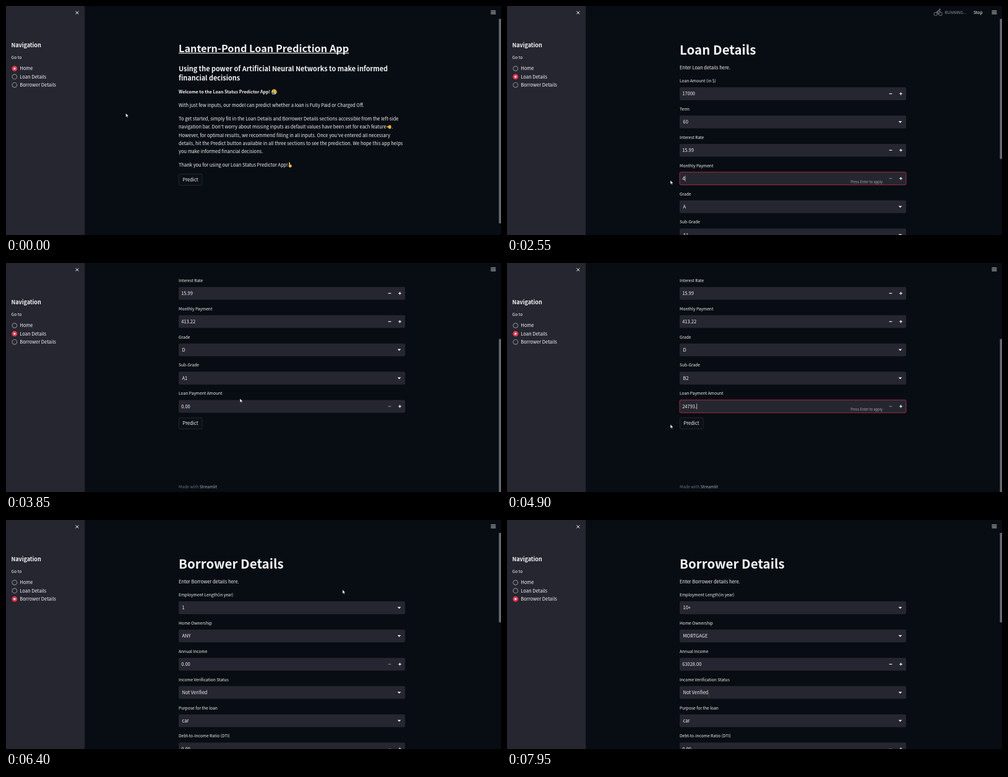
An HTML page with a canvas for the animation above (8 s loop, 800 by 372 pixels).

```html
<!DOCTYPE html>
<html lang="en">
<head>
<meta charset="utf-8">
<title>Loan Prediction App</title>
<style>
html, body { margin: 0; width: 100%; height: 100%; overflow: hidden; background: #070d12; }
canvas { display: block; width: 800px; height: 372px; }
</style>
</head>
<body>
<canvas id="stage"></canvas>
<script>
const W = 800, H = 372, LOOP = 8000;
const LEFT = 279, RIGHT = 645, ROW = 45.9, ITEM = 20.85;
const BG = '#070d12', PANEL = '#25262f', INK = '#f4f5f7', RED = '#c22f4a';
const FAMILY = '"Noto Sans CJK SC", "Noto Sans CJK JP", "Noto Sans", sans-serif';

const canvas = document.getElementById('stage');
const ctx = canvas.getContext('2d');
const dpr = window.devicePixelRatio || 1;
canvas.width = W * dpr;
canvas.height = H * dpr;

// Rows: label, kind, starting value
const num = (label, value = '0.00') => ({ label, kind: 'num', value });
const pick = (label, value) => ({ label, kind: 'pick', value });
const pages = {
  loan: {
    title: 'Loan Details', intro: 'Enter Loan details here.',
    rows: [
      num('Loan Amount (in $)', '0'), pick('Term', '36'), num('Interest Rate'),
      num('Monthly Payment'), pick('Grade', 'A'), pick('Sub-Grade', 'A1'),
      num('Loan Payment Amount')
    ]
  },
  borrower: {
    title: 'Borrower Details', intro: 'Enter Borrower details here.',
    rows: [
      pick('Employment Length(in year)', '1'), pick('Home Ownership', 'ANY'),
      num('Annual Income'), pick('Income Verification Status', 'Not Verified'),
      pick('Purpose for the loan', 'car'), num('Debt-to-Income Ratio (DTI)'),
      num('Delinquency count in the past 2 years'),
      num('Credit inquiry count in the last 6 months:'),
      num('Open credit account count'), num('Derogatory public record count'),
      num('Revolving balance'), num('Revolving line utilization rate'),
      num('Total credit account count')
    ]
  }
};

// Typed fields: focus, first key, last key, commit
const typed = [
  { page: 'loan', row: 0, at: [900, 980, 1240, 1390], text: '17000', done: '17000' },
  { page: 'loan', row: 2, at: [1990, 2040, 2280, 2420], text: '15.99', done: '15.99' },
  { page: 'loan', row: 3, at: [2420, 2530, 2850, 2920], text: '413.22', done: '413.22' },
  { page: 'loan', row: 6, at: [4550, 4600, 5000, 5080], text: '24793.2', done: '24793.20' },
  { page: 'borrower', row: 2, at: [7370, 7450, 7800, 7880], text: '63028', done: '63028.00' }
];

// Opened lists: open time, choice time, chosen value
const lists = [
  { page: 'loan', row: 1, at: [1600, 1810], items: ['36', '60'], value: '60' },
  { page: 'loan', row: 4, at: [3400, 3600], items: [...'ABCDEFG'], value: 'D' },
  { page: 'loan', row: 5, at: [4060, 4350],
    items: [...'AB'].flatMap(g => [1, 2, 3, 4, 5].map(n => g + n)), value: 'B2' },
  { page: 'borrower', row: 0, at: [6480, 6720],
    items: ['1', '2', '3', '4', '5', '6', '7', '8', '9', '10+'], value: '10+' },
  { page: 'borrower', row: 1, at: [6890, 7150],
    items: ['ANY', 'MORTGAGE', 'NONE', 'OTHER', 'OWN', 'RENT'], value: 'MORTGAGE' }
];

const runs = [
  [550, 740], [1390, 1560], [1810, 1980], [2420, 2620], [2920, 3080], [3600, 3800],
  [4350, 4520], [5080, 5280], [5300, 5490], [6720, 7080], [7150, 7330]
];

const scrollKeys = [
  [0, 0], [3000, 0], [3250, 185], [5300, 185], [5301, 0],
  [5650, 0], [5950, 189], [6050, 189], [6300, 0]
];

const mouseKeys = [
  [0, 193.5, 174, 'arrow'], [300, 193.5, 174, 'arrow'], [540, 46, 116, 'hand'],
  [680, 46, 116, 'arrow'], [890, 400, 143, 'beam'], [1000, 400, 143, 'arrow'],
  [1250, 248.6, 148, 'arrow'], [1400, 248.6, 148, 'arrow'], [1590, 400, 188, 'hand'],
  [1770, 300, 229, 'hand'], [1850, 300, 229, 'arrow'], [1980, 310, 235, 'beam'],
  [2290, 310, 235, 'arrow'], [2410, 300, 280, 'arrow'], [2530, 264, 283, 'arrow'],
  [2950, 264, 283, 'arrow'], [3380, 400, 141, 'hand'], [3590, 378, 220, 'arrow'],
  [3870, 378, 220, 'arrow'], [4050, 400, 187, 'hand'], [4330, 330, 334, 'hand'],
  [4380, 330, 334, 'arrow'], [4540, 330, 234, 'beam'], [4620, 330, 234, 'arrow'],
  [4800, 264, 262, 'arrow'], [5080, 264, 262, 'arrow'], [5290, 50, 129, 'hand'],
  [5430, 50, 129, 'arrow'], [5650, 799, 60, 'arrow'], [5950, 799, 179, 'arrow'],
  [6050, 799, 179, 'arrow'], [6300, 799, 60, 'arrow'], [6470, 400, 143, 'hand'],
  [6710, 300, 350, 'hand'], [6880, 400, 188, 'hand'], [7000, 302.7, 243, 'hand'],
  [7140, 305, 231, 'hand'], [7350, 326, 235, 'beam'], [7620, 326, 235, 'beam'],
  [7740, 326, 285, 'beam']
];

function sample(keys, t) {
  let i = 0;
  while (i < keys.length - 1 && keys[i + 1][0] <= t) i++;
  const a = keys[i], b = keys[i + 1] || a;
  let k = b === a ? 0 : (t - a[0]) / (b[0] - a[0]);
  k = k * k * (3 - 2 * k);
  return a.map((v, j) => typeof v === 'number' ? v + (b[j] - v) * k : v);
}

// Writes text centred on y by its capitals and returns the right edge
function write(s, x, y, size, color = INK, weight = 400, align = 'left') {
  ctx.font = `${weight} ${size}px ${FAMILY}`;
  ctx.textAlign = align;
  ctx.fillStyle = color;
  ctx.fillText(s, x, y + size * 0.365);
  return x + ctx.measureText(s).width;
}

function box(x, y, w, h, fill, stroke, r = 2) {
  ctx.beginPath();
  ctx.roundRect(x, y, w, h, r);
  if (fill) { ctx.fillStyle = fill; ctx.fill(); }
  if (stroke) { ctx.strokeStyle = stroke; ctx.lineWidth = 0.8; ctx.stroke(); }
}

function disc(x, y, r, color) {
  ctx.fillStyle = color;
  ctx.beginPath();
  ctx.arc(x, y, r, 0, Math.PI * 2);
  ctx.fill();
}

function ring(x, y, r, color, width) {
  ctx.strokeStyle = color;
  ctx.lineWidth = width;
  ctx.beginPath();
  ctx.arc(x, y, r, 0, Math.PI * 2);
  ctx.stroke();
}

// Polylines given as lists of x, y pairs
function path(lines, color, width) {
  ctx.strokeStyle = color;
  ctx.lineWidth = width;
  ctx.beginPath();
  for (const p of lines)
    for (let i = 0; i < p.length; i += 2) ctx[i ? 'lineTo' : 'moveTo'](p[i], p[i + 1]);
  ctx.stroke();
}

function shape(p, fill, stroke) {
  ctx.beginPath();
  for (let i = 0; i < p.length; i += 2) ctx[i ? 'lineTo' : 'moveTo'](p[i], p[i + 1]);
  ctx.closePath();
  ctx.fillStyle = fill;
  ctx.fill();
  if (stroke) { ctx.strokeStyle = stroke; ctx.lineWidth = 0.6; ctx.stroke(); }
}

function button(y) {
  box(LEFT + 0.4, y - 9.2, 37.6, 18.4, '#0b1016', '#2b2e36');
  write('Predict', 298, y, 7.5, INK, 400, 'center');
}

function drawHome() {
  const end = write('Lantern-Pond Loan Prediction App', LEFT, 69, 16.25, INK, 700);
  ctx.fillRect(LEFT, 76, end - LEFT, 1.1);
  write('Using the power of Artificial Neural Networks to make informed', LEFT, 102.5, 10.87, INK, 700);
  write('financial decisions', LEFT, 117.5, 10.87, INK, 700);

  let x = write('Welcome to the Loan Status Predictor App!', LEFT, 139.5, 7.08, INK, 700);
  disc(x + 6.2, 139.5, 4.3, '#f3bd3c');
  box(x + 2.6, 140, 4, 4, '#4a83b5', null, 1);
  path([[x + 4.7, 137.6, x + 6, 138.4], [x + 7.7, 137.6, x + 8.7, 138.4]], '#5a3b14', 0.9);

  const lines = [
    'With just few inputs, our model can predict whether a loan is Fully Paid or Charged Off.',
    'To get started, simply fill in the Loan Details and Borrower Details sections accessible from the left-side',
    "navigation bar. Don't worry about missing inputs as default values have been set for each feature",
    "However, for optimal results, we recommend filling in all inputs. Once you've entered all necessary",
    'details, hit the Predict button available in all three sections to see the prediction. We hope this app helps',
    'you make informed financial decisions.'
  ];
  lines.forEach((s, i) => {
    const y = i ? 183 + (i - 1) * 13.42 : 161;
    const end = write(s, LEFT, y, 7.5);
    if (i !== 2) return;
    box(end + 3.2, y - 3, 4.5, 6.2, '#f3b53a', null, 2);
    box(end + 0.6, y - 1.2, 5, 2, '#f3b53a', null, 1);
    write('.', end + 8.4, y, 7.5);
  });
  x = write('Thank you for using our Loan Status Predictor App!', LEFT, 258, 7.5);
  box(x + 1, 257.5, 4.8, 4.8, '#f3b53a', null, 2);
  box(x + 1.3, 253.8, 1.8, 5, '#f3b53a', null, 0.9);
  button(282);
}

function drawRow(row, mid, focus, text, dirty) {
  write(row.label, LEFT, mid - 21, 6.67);
  box(LEFT, mid - 10.4, RIGHT - LEFT, 20.8, PANEL, focus ? RED : null);
  if (row.kind === 'pick') {
    write(text, 284.5, mid, 7.5);
    shape([632.7, mid - 1.3, 638.3, mid - 1.3, 635.5, mid + 1.7], INK);
    return;
  }
  const end = write(text, 283.2, mid, 7.5);
  if (focus) path([[end + 0.6, mid - 4.5, end + 0.6, mid + 4.5]], INK, 0.7);
  if (dirty) write('Press Enter to apply', 607, mid + 5.4, 5.6, '#a3a5ab', 400, 'right');
  const off = !Number(row.shown);
  path([[617.7, mid, 622.3, mid]], off ? '#7c7e86' : INK, 1.2);
  path([[634.2, mid, 638.8, mid], [636.5, mid - 2.3, 636.5, mid + 2.3]], INK, 1.2);
}

function drawForm(name, t, top) {
  const page = pages[name];
  write(page.title, LEFT, 72 - top, 20.5, INK, 700);
  write(page.intro, LEFT, 100.3 - top, 7.5);
  page.rows.forEach((row, i) => {
    const mid = 142.5 + ROW * i - top;
    const here = e => e.page === name && e.row === i;
    const entry = typed.find(here), list = lists.find(here);
    let text = row.value, focus = false, dirty = false;
    row.shown = row.value;
    if (list) {
      if (t >= list.at[1]) text = list.value;
      focus = t >= list.at[0] && t < list.at[1];
    }
    if (entry) {
      const [focusAt, from, to, commit] = entry.at;
      if (t >= commit) text = row.shown = entry.done;
      else if (t >= focusAt) {
        focus = true;
        const n = Math.ceil((t - from) / (to - from) * entry.text.length);
        dirty = n > 0;
        if (dirty) text = entry.text.slice(0, n);
      }
    }
    drawRow(row, mid, focus, text, dirty);
  });
  const end = 121.5 + ROW * page.rows.length - top;
  button(end + 2.7);
  const x = write('Made with ', LEFT, end + 105.5, 6.67, '#6f7279');
  write('Streamlit', x, end + 105.5, 6.67, '#a9abb1');
}

function drawList(list, top, mouse) {
  const y = 142.5 + ROW * list.row - top + 10.4;
  box(LEFT, y, RIGHT - LEFT, list.items.length * ITEM + 0.8, BG);
  list.items.forEach((s, i) => {
    const iy = y + i * ITEM;
    if (mouse[2] >= iy && mouse[2] < iy + ITEM) box(LEFT, iy, RIGHT - LEFT, ITEM, PANEL, null, 0);
    write(s, 287, iy + ITEM / 2, 7.5);
  });
}

function drawSidebar(current, fade) {
  ctx.fillStyle = PANEL;
  ctx.fillRect(0, 0, 127.3, H);
  path([[112.5, 8.5, 117.3, 13.3], [117.3, 8.5, 112.5, 13.3]], INK, 1);
  ctx.globalAlpha = fade;
  write('Navigation', 8.5, 63.3, 9, INK, 700);
  write('Go to', 8.5, 84, 6.8);
  [['home', 'Home'], ['loan', 'Loan Details'], ['borrower', 'Borrower Details']].forEach(([id, label], i) => {
    const y = 101.6 + i * 13.35;
    if (id === current) {
      disc(13.8, y, 4.4, '#ee3650');
      disc(13.8, y, 1.6, INK);
    } else {
      ring(13.8, y, 3.8, '#83858d', 1.2);
    }
    write(label, 22.2, y, 7.55);
  });
  ctx.globalAlpha = 1;
}

function drawCyclist(color) {
  ring(692.6, 13, 2.7, color, 0.8);
  ring(700.6, 13, 2.7, color, 0.8);
  path([[696.8, 14, 697, 11.2, 694.6, 9.6, 697.6, 7.2, 699, 9, 701, 9]], color, 1.1);
  disc(699.3, 5.6, 1.2, color);
}

function drawRunner(color) {
  disc(699, 5.6, 1.3, color);
  path([[698, 7.4, 696.6, 11, 699.2, 13, 698.6, 16], [696.6, 11, 695.6, 13.6, 692.6, 14.4],
    [694, 10, 695, 7.8, 698, 7.6, 699.4, 9.6, 701.3, 9.8]], color, 1.1);
}

// The status icon changes after the first 200 ms of a run
function drawHeader(run, t) {
  ctx.fillStyle = BG;
  ctx.fillRect(127.3, 0, W - 127.3, 21);
  path([7.9, 10.3, 12.7].map(y => [783.5, y, 791.5, y]), '#d6d8db', 1);
  if (!run) return;
  (t - run[0] < 200 ? drawCyclist : drawRunner)('#8b8d93');
  write('RUNNING...', 707.6, 10.7, 6.55, '#96989e');
  write('Stop', 754, 10.7, 6.8);
}

function drawScrollbar(top, total) {
  const y = top * H / total, bottom = y + H * H / total;
  ctx.fillStyle = '#686b71';
  ctx.fillRect(796.6, Math.max(21, y), 3.4, bottom - Math.max(21, y));
}

function drawMouse([, x, y, kind]) {
  ctx.save();
  ctx.translate(x, y);
  if (kind === 'arrow') {
    shape([0, 0, 0, 6.6, 1.5, 5.3, 2.6, 7.6, 3.6, 7.1, 2.6, 5, 4.6, 4.8], '#fff', '#111');
  } else if (kind === 'hand') {
    shape([-0.8, 0, 0.5, 0, 0.8, 3, 3.8, 4, 3.6, 7.4, 2.7, 9, -0.8, 9, -2.6, 6, -2.2, 5, -0.8, 6], '#fff', '#111');
  } else {
    path([[0, -3.8, 0, 3.8]], '#4a4c53', 0.7);
  }
  ctx.restore();
}

function draw(t) {
  const page = t < 560 ? 'home' : t < 5310 ? 'loan' : 'borrower';
  const top = sample(scrollKeys, t)[1];
  const mouse = sample(mouseKeys, t);
  const run = runs.find(([a, b]) => t >= a && t < b);
  const list = lists.find(({ at }) => t >= at[0] && t < at[1]);
  const fade = run && t > run[0] + 150 ? 0.37 : 1;
  const total = page === 'home' ? 392 : 235.7 + ROW * pages[page].rows.length;

  ctx.setTransform(dpr, 0, 0, dpr, 0, 0);
  ctx.fillStyle = BG;
  ctx.fillRect(0, 0, W, H);
  ctx.globalAlpha = fade;
  if (page === 'home') drawHome();
  else drawForm(page, t, top);
  ctx.globalAlpha = 1;
  // An open list locks scrolling and hides the bar
  if (!list) drawScrollbar(top, total);
  drawHeader(run, t);
  drawSidebar(page, fade);
  if (list) drawList(list, top, mouse);
  drawMouse(mouse);
}

const start = performance.now();
function frame() {
  draw((performance.now() - start) % LOOP);
  requestAnimationFrame(frame);
}
frame();
</script>
</body>
</html>
```
